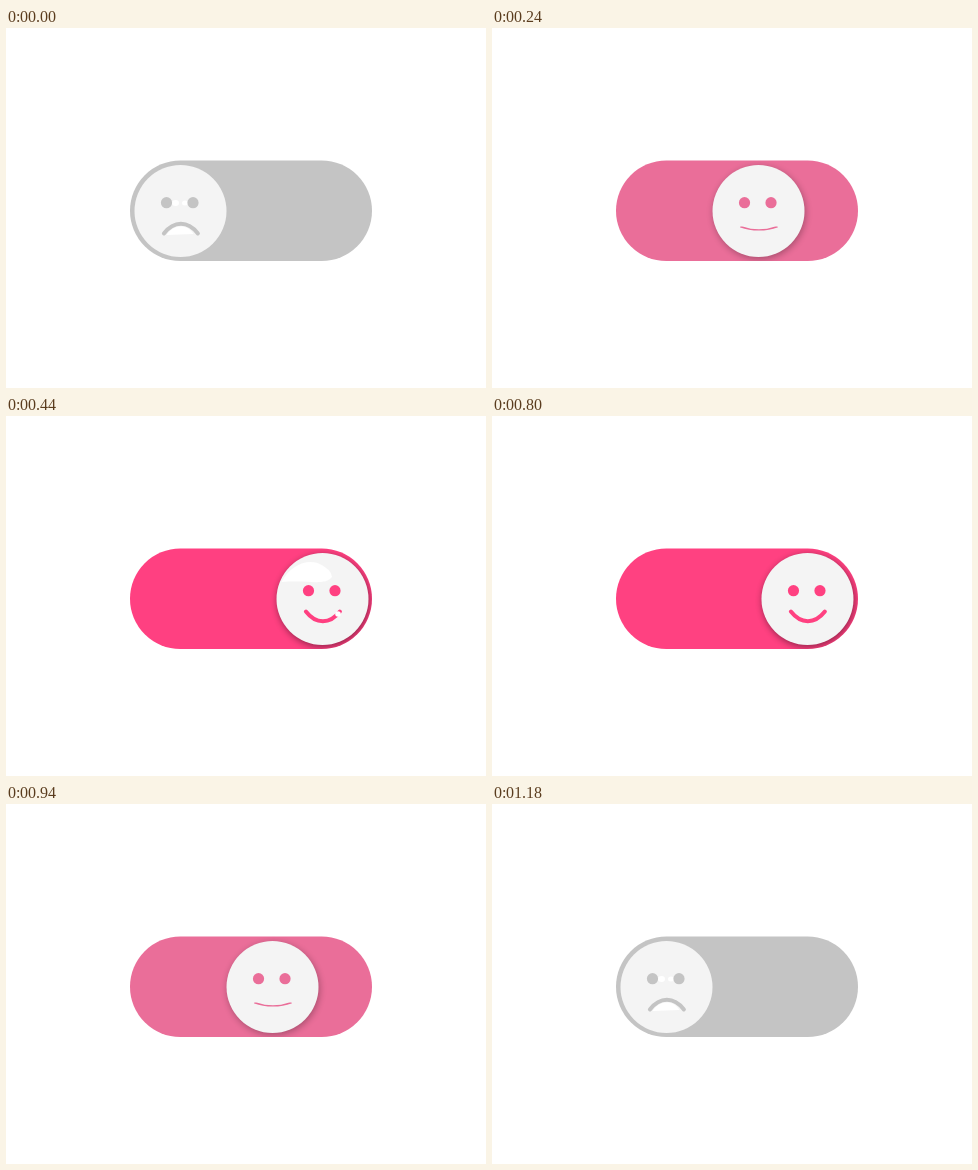
Write an HTML page that moves like this. It is 480 px wide and 360 px high and loops after 2580 ms.

```html
<!DOCTYPE html>
<html lang="en">
<head>
<meta charset="utf-8">
<title>Mood switch</title>
<style>
  html, body { margin: 0; width: 100%; height: 100%; overflow: hidden; background: #fff; }
  svg { display: block; width: 100%; height: 100%; }
</style>
</head>
<body>
<svg id="stage" viewBox="0 0 480 360">
  <defs>
    <clipPath id="trackClip"><rect x="124" y="132.4" width="242" height="100.6" rx="50.3"/></clipPath>
    <filter id="blur" x="-30%" y="-30%" width="160%" height="160%"><feGaussianBlur stdDeviation="3.5"/></filter>
  </defs>
  <rect x="124" y="132.4" width="242" height="100.6" rx="50.3" fill="currentColor"/>
  <g clip-path="url(#trackClip)">
    <circle id="shadow" cy="185" r="46" filter="url(#blur)"/>
  </g>
  <!-- The knob is drawn around its own centre. -->
  <g id="knob">
    <circle r="46" fill="#f4f4f4"/>
    <g id="sadShine" fill="#fff">
      <ellipse cx="-5" cy="-8" rx="3.5" ry="3"/>
      <ellipse cx="4.5" cy="-8" rx="3" ry="2.5"/>
      <path d="M-14 24C-7 13 7 13 13 23Z"/>
    </g>
    <path id="happyShine" fill="#fff" d="M-41 -17C-33 -33-17 -40-5 -36Q9 -30 9.500 -22C2 -13-12 -19-41 -17Z"/>
    <g fill="currentColor">
      <circle cx="-14" cy="-8.300" r="5.600"/>
      <circle cx="12.500" cy="-8.300" r="5.600"/>
    </g>
    <path id="mouth" d="M-17 5C-7 -8 7 -8 17 5" fill="none" stroke="currentColor" stroke-width="4" stroke-linecap="round"/>
    <circle id="happySpeck" cx="15.500" cy="15" r="2.800" fill="#fff"/>
  </g>
</svg>
<script>
const LOOP = 2580, STEP = 20, SLIDE = 400, SWITCH_OFF = 780;
const OFF_COLOR = [196, 196, 196], ON_COLOR = [255, 64, 129];
const OFF_X = 174.5, TRAVEL = 142;
const get = id => document.getElementById(id);
const [stage, shadow, knob, mouth] = ["stage", "shadow", "knob", "mouth"].map(get);

function ease(u) {
  const t = Math.min(1, Math.max(0, u));
  return t * t * (3 - 2 * t);
}

function show(id, visible) {
  get(id).style.display = visible ? "" : "none";
}

function draw(time) {
  const t = Math.floor((time % LOOP) / STEP) * STEP;
  const on = ease(t / SLIDE) - ease((t - SWITCH_OFF) / SLIDE);
  const x = OFF_X + TRAVEL * on;
  const color = OFF_COLOR.map((c, i) => Math.round(c + (ON_COLOR[i] - c) * on));

  stage.style.color = `rgb(${color})`;
  knob.setAttribute("transform", `translate(${x} 183)`);
  mouth.setAttribute("transform", `translate(0.4 17.5) scale(1 ${1 - 2 * on})`);
  shadow.setAttribute("cx", x + 1);
  shadow.setAttribute("opacity", 0.45 * on);

  show("sadShine", on === 0);
  show("happyShine", on === 1);
  show("happySpeck", on === 1);
}

const start = performance.now();
function tick() {
  draw(performance.now() - start);
  requestAnimationFrame(tick);
}
tick();
</script>
</body>
</html>
```
